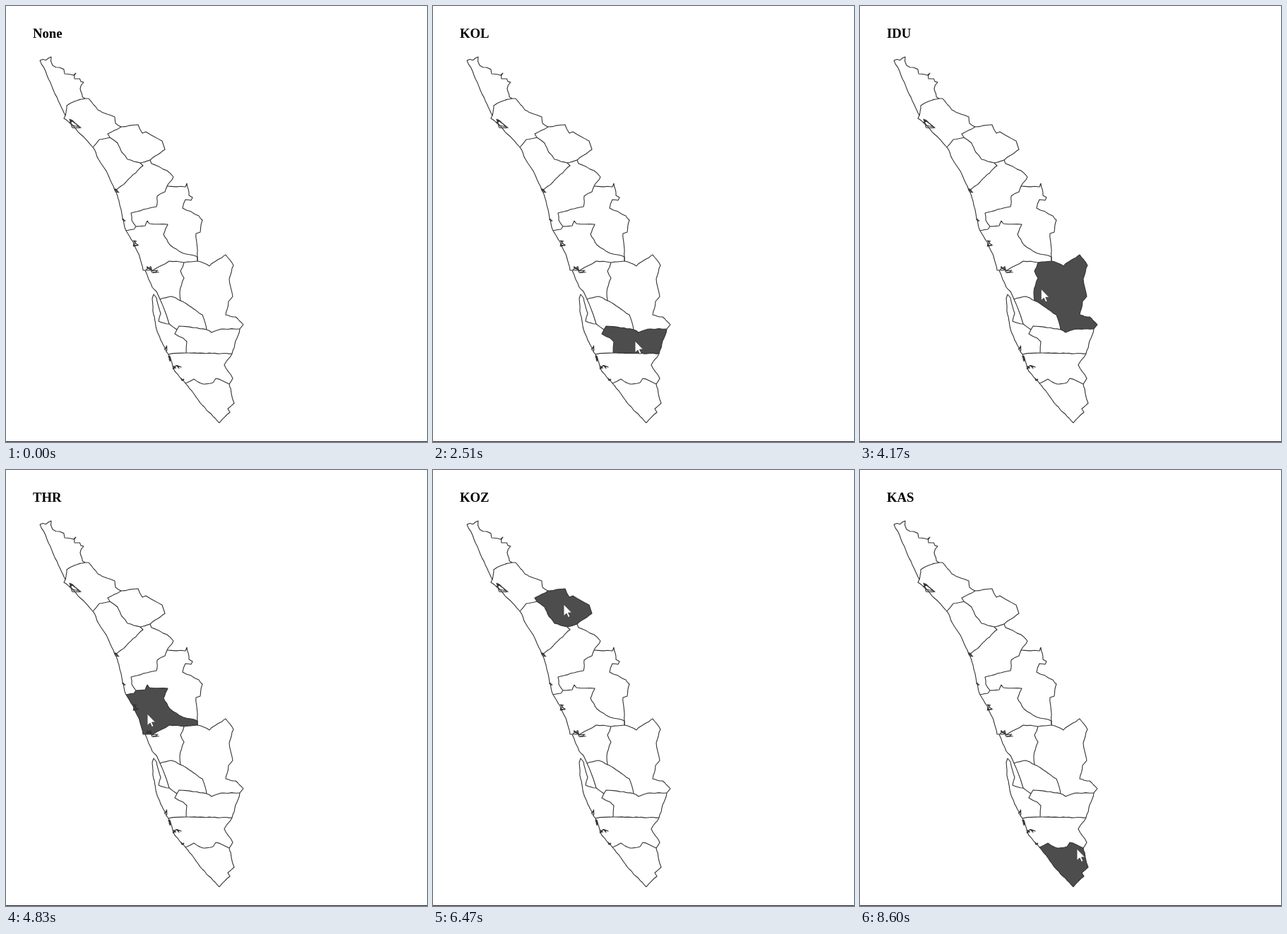
Recreate the animation shown at these times as an HTML page. Size 596 px wide and 617 px high, loop 9 s.

```html
<!DOCTYPE html>
<html lang="en">
<head>
<meta charset="utf-8">
<title>District map</title>
<style>
  html, body { margin: 0; width: 100%; height: 100%; overflow: hidden; background: #fff; }
  svg { display: block; }
  #borders, #inlets { fill: none; stroke: #333; stroke-width: 1.1; stroke-linejoin: round; }
  #districts { fill: #4d4d4d; }
  #label { font: bold 18.72px "Liberation Serif", "Times New Roman", serif; }
</style>
</head>
<body>
<svg width="596" height="617" viewBox="0 0 596 617">
  <g id="districts"></g>
  <g id="borders">
    <path id="kasCoast" d="M48,77 58,98 67,119 77,140 84,155"/>
    <path id="kasOuter" class="ragged" d="M48,77 64,72 66,84 76,87 83,96 99,95 97,103 110,108 105,117 112,131"/>
    <path id="kasKan" d="M112,131 97,135 86,141 84,155"/>
    <path id="kanCoast" d="M84,155 82,159 94,168 105,181 123,200"/>
    <path id="kanOuter" d="M112,131 117,131 130,147 143,153 154,157 155,166 163,171"/>
    <path id="kanWay" d="M163,171 144,181 147,186"/>
    <path id="kanKoz" d="M147,186 132,189 123,200"/>
    <path id="wayOuter" d="M163,171 187,168 193,180 198,178 221,191 225,203 217,209 204,218"/>
    <path id="wayMal" d="M204,218 190,222"/>
    <path id="kozWay" d="M147,186 158,194 164,207 172,217 190,222"/>
    <path id="kozCoast" d="M123,200 131,217 145,240 154,261"/>
    <path id="kozMal" d="M190,222 194,226 184,236 170,249 154,261"/>
    <path id="malCoast" d="M154,261 160,276 165,300 170,318"/>
    <path id="malOuter" d="M204,218 206,223 228,233 237,242 228,255"/>
    <path id="malPal" d="M228,255 225,263 214,269 213,284 177,293 178,303 184,312"/>
    <path id="malThr" d="M184,312 181,316 170,318"/>
    <path id="palOuter" d="M228,255 254,256 256,251 259,268 264,271 262,275 254,274 250,286 273,297 278,303 275,320 269,322 271,355"/>
    <path id="thrPal" d="M184,312 197,311 200,304 203,308 229,309 223,323 232,338 251,350 271,355"/>
    <path id="thrIdu" d="M271,355 271,361 252,363"/>
    <path id="thrErn" d="M252,363 231,361 208,374 197,374"/>
    <path id="thrCoast" d="M170,318 180,334 190,358 194,374 197,374"/>
    <path id="ernCoast" d="M197,374 207,398 213,404 218,415"/>
    <path id="ernIdu" d="M252,363 247,375 252,385 246,405 247,417"/>
    <path id="ernKot" d="M247,417 234,411 218,415"/>
    <path id="iduOuter" d="M271,355 271,361 288,368 311,352 322,367 316,386 321,411 315,418 311,437 325,440 336,451 331,457"/>
    <path id="kotIdu" d="M247,417 278,437 284,458"/>
    <path id="iduPta" d="M284,458 291,462 308,457 331,457"/>
    <path id="kotPta" d="M284,458 245,453 242,458"/>
    <path id="kotLake" d="M218,415 227,437 231,450"/>
    <path id="kotAla" d="M231,450 242,458"/>
    <path id="alaLake" d="M209,408 213,413 219,435 216,446 231,450"/>
    <path id="alaCoast" d="M209,408 207,414 209,437 216,465 230,493"/>
    <path id="alaPta" d="M242,458 239,464 251,470 256,475 255,491"/>
    <path id="alaKol" d="M255,491 230,493"/>
    <path id="ptaKol" d="M255,491 320,492"/>
    <path id="ptaOuter" d="M331,457 325,474 320,492"/>
    <path id="kolCoast" d="M230,493 239,517 254,534"/>
    <path id="kolOuter" d="M320,492 309,508 321,527 316,535"/>
    <path id="kolTvm" d="M254,534 266,528 279,535 293,533 297,527 316,535"/>
    <path id="tvmCoast" d="M254,534 278,565 302,590"/>
    <path id="tvmOuter" d="M316,535 323,562 314,570 317,575 302,590"/>
  </g>
  <path id="inlets"/>
  <text id="label" x="38" y="45">None</text>
  <path d="M0,616.5H596" stroke="#222"/>
  <path id="pointer" d="M0,0V16.5L4,13 6.5,18.5 9,17.5 6.5,12H11.5Z" fill="#fff" stroke="#444" stroke-width=".9"/>
</svg>
<script>
const byId = id => document.getElementById(id);
const svg = document.querySelector('svg');

let seed = 7;
function jitter() {
  seed = seed * 16807 % 2147483647;
  return seed / 2147483647 - 0.5;
}

// Splits long edges at a point pushed sideways.
function roughen(a, b, amount) {
  const dx = b[0] - a[0], dy = b[1] - a[1];
  const length = Math.hypot(dx, dy);
  if (length < 7) return [b];
  const push = jitter() * amount * Math.min(length, 12) / length;
  const middle = [(a[0] + b[0]) / 2 - dy * push, (a[1] + b[1]) / 2 + dx * push];
  return [...roughen(a, middle, amount), ...roughen(middle, b, amount)];
}

const borders = {};
for (const path of byId('borders').children) {
  const corners = path.getAttribute('d').slice(1).split(' ').map(p => p.split(',').map(Number));
  const amount = path.classList.contains('ragged') ? 0.6 : 0.13;
  const points = corners.flatMap((p, i) => i ? roughen(corners[i - 1], p, amount) : [p]);
  path.setAttribute('d', `M${points.join(' ')}`);
  borders[path.id] = points;
}

// Small tangled inlets: centre, width, height
const inlets = [
  [98, 166, 18, 14], [157, 262, 7, 7], [167, 303, 5, 4], [184, 336, 8, 8], [202, 371, 12, 9],
  [211, 376, 12, 4], [226, 484, 5, 11], [232, 498, 5, 11], [243, 514, 15, 13], [250, 528, 5, 4]
];
byId('inlets').setAttribute('d', inlets.map(([x, y, w, h]) =>
  'M' + Array.from({ length: 9 }, () => [x + jitter() * w, y + jitter() * h]).join(' ')).join(''));

// Each district is a ring of borders; "-" walks one backwards.
const rings = {
  KAS: 'kasOuter kasKan -kasCoast',
  KAN: '-kasKan kanOuter kanWay kanKoz -kanCoast',
  WAY: 'wayOuter wayMal -kozWay -kanWay',
  KOZ: '-kanKoz kozWay kozMal -kozCoast',
  MAL: '-kozMal -wayMal malOuter malPal malThr -malCoast',
  PAL: 'palOuter -thrPal -malPal',
  THR: '-malThr thrPal thrIdu thrErn -thrCoast',
  ERN: '-thrErn ernIdu ernKot -ernCoast',
  IDU: 'iduOuter -iduPta -kotIdu -ernIdu -thrIdu',
  KOT: '-ernKot kotIdu kotPta -kotAla -kotLake',
  ALA: 'alaLake kotAla alaPta alaKol -alaCoast',
  PAT: '-kotPta iduPta ptaOuter -ptaKol -alaPta',
  KOL: '-alaKol ptaKol kolOuter -kolTvm -kolCoast',
  THI: 'kolTvm tvmOuter -tvmCoast'
};

const walk = name => name[0] === '-' ? borders[name.slice(1)].toReversed() : borders[name];

const districts = Object.entries(rings).map(([code, ring]) => {
  const shape = document.createElementNS(svg.namespaceURI, 'path');
  shape.setAttribute('d', `M${ring.split(' ').flatMap(walk).join(' ')}Z`);
  byId('districts').append(shape);
  return { code, shape };
});

// Pointer rests: arrival, departure, x, y. It clicks shortly before leaving.
const rests = [
  [0, 800, 312, 628],
  [1380, 1670, 293, 559],
  [1850, 2170, 283, 512],
  [2510, 2760, 286, 474],
  [2960, 3250, 235, 476],
  [3440, 3630, 250, 434],
  [3800, 4070, 280, 410],
  [4300, 4600, 226, 388],
  [4740, 4930, 200, 345],
  [5150, 5370, 243, 308],
  [5520, 5890, 182, 267],
  [6080, 6290, 160, 220],
  [6460, 6700, 185, 190],
  [6850, 7150, 118, 154],
  [7360, 7550, 74, 119],
  [7550, 7770, 74, 119],
  [8500, 9200, 307, 536]
];
const clickLead = 100;

function pointerAt(t) {
  const i = rests.findLastIndex(r => r[0] <= t);
  const [, leave, x, y] = rests[i];
  if (t <= leave) return [x, y];
  const [arrive, , nextX, nextY] = rests[i + 1];
  const k = (t - leave) / (arrive - leave);
  return [x + (nextX - x) * k, y + (nextY - y) * k];
}

function districtAt([x, y]) {
  const point = svg.createSVGPoint();
  point.x = x;
  point.y = y;
  return districts.find(d => d.shape.isPointInFill(point));
}

function draw(t) {
  const tip = pointerAt(t);
  const hovered = districtAt(tip);
  const clicked = rests.findLast(r => r[1] - clickLead <= t);
  const chosen = clicked && districtAt(clicked.slice(2));
  for (const d of districts) d.shape.style.opacity = d === hovered ? 1 : 0;
  byId('label').textContent = chosen ? chosen.code : 'None';
  byId('pointer').setAttribute('transform', `translate(${tip})`);
}

const begin = performance.now();
function tick() {
  draw((performance.now() - begin) % 9000);
  requestAnimationFrame(tick);
}
tick();
</script>
</body>
</html>
```
